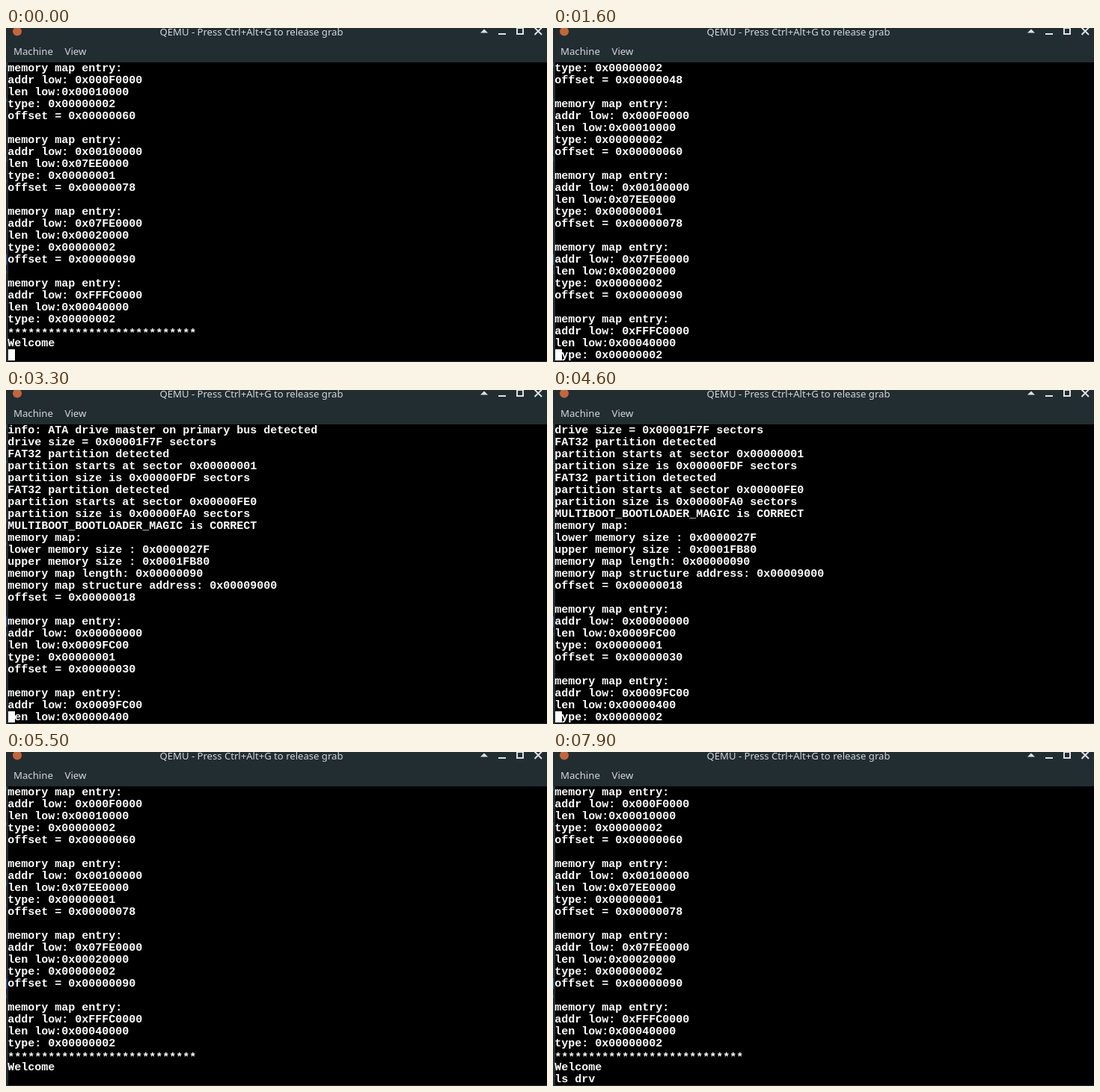
Animation, 723 px wide and 447 px high, one loop 8000 ms. Source, as an HTML page:

```html
<!DOCTYPE html>
<html lang="en">
<head>
<meta charset="utf-8">
<title>Terminal scrollback</title>
<style>
  html, body { margin: 0; width: 100%; height: 100%; overflow: hidden; background: #000; }
  svg { display: block; width: 723px; height: 447px; }
  .ui { font-family: "Noto Sans", sans-serif; font-size: 13.2px; fill: #d3d7d9; }
  .term { font: bold 15px "Liberation Mono", monospace; fill: #fff; white-space: pre; }
</style>
</head>
<body>
<svg viewBox="0 0 723 447" xmlns="http://www.w3.org/2000/svg">
  <rect width="723" height="447" fill="#000"/>
  <rect width="723" height="46" fill="#222d32"/>
  <rect y="46" width="3" height="401" fill="#222d32"/>
  <rect y="446" width="723" height="1" fill="#222d32"/>
  <g fill="#17576a">
    <rect y="46" width="1" height="6"/>
    <rect y="94" width="1" height="5"/>
    <rect y="172" width="1" height="7"/>
    <rect y="203" width="1" height="5"/>
    <rect y="325" width="1" height="4"/>
  </g>
  <rect y="303" width="1" height="14" fill="#2864c8"/>
  <circle cx="15" cy="4.5" r="6" fill="#c5653a"/>
  <g class="ui">
    <text x="328" y="10" text-anchor="middle" font-size="13.1">QEMU - Press Ctrl+Alt+G to release grab</text>
    <text x="10" y="36">Machine</text>
    <text x="78.5" y="36">View</text>
  </g>
  <path d="M634 6.5L639 1.5L644 6.5Z" fill="#dfe2e3"/>
  <g fill="none" stroke="#dfe2e3" stroke-width="2">
    <path d="M658 8H668"/>
    <rect x="683" y="0" width="8" height="8"/>
    <path d="M706.5 -.5L716 9M716 -.5L706.5 9"/>
  </g>
  <g id="rows" class="term"></g>
  <rect id="cursor" y="430" width="9" height="15" fill="#fff"/>
</svg>
<script>
const LOOP = 8000, ROWS = 25, LEFT = 3, TOP = 46, CELL_W = 9, CELL_H = 16;
const BEARING = -0.75; // glyphs sit left of the middle of their cell

// base, length, type and following offset of each memory region
const regions = [
  ['00000000', '0009FC00', 1, '30'],
  ['0009FC00', '00000400', 2, '48'],
  ['000F0000', '00010000', 2, '60'],
  ['00100000', '07EE0000', 1, '78'],
  ['07FE0000', '00020000', 2, '90'],
  ['FFFC0000', '00040000', 2]
];

const partition = (start, size) => [
  'FAT32 partition detected',
  `partition starts at sector 0x00000${start}`,
  `partition size is 0x00000${size} sectors`
];

const region = ([base, len, type, offset]) => [
  'memory map entry:',
  `addr low: 0x${base}`,
  `len low:0x${len}`,
  `type: 0x0000000${type}`,
  ...(offset ? [`offset = 0x000000${offset}`, ''] : [])
];

const log = [
  'info: ATA drive master on primary bus detected',
  'drive size = 0x00001F7F sectors',
  ...partition('001', 'FDF'),
  ...partition('FE0', 'FA0'),
  'MULTIBOOT_BOOTLOADER_MAGIC is CORRECT',
  'memory map:',
  'lower memory size : 0x0000027F',
  'upper memory size : 0x0001FB80',
  'memory map length: 0x00000090',
  'memory map structure address: 0x00009000',
  'offset = 0x00000018',
  '',
  ...regions.flatMap(region),
  '*'.repeat(28),
  'Welcome'
];

const command = 'ls drv';

// Each track holds [start time, value] pairs.
const scroll = [[0, 28], [500, 27], [800, 26], [1100, 25], [1900, 0],
  [4600, 1], [4700, 2], [4900, 3], [5500, 28]];
const typed = [[0, 0], [6800, 1], [7000, 2], [7200, 3], [7400, 4], [7600, 5], [7900, 6]];
const blink = [0, 300, 600, 800, 1100, 1300, 1600, 1900, 2200, 2400, 2800, 3100,
  3300, 3600, 3900, 4100, 4400, 4700, 5600, 5800, 6000, 6300, 6600, 6900,
  7200, 7400, 7700, 7900].map((t, i) => [t, i % 2 === 0]);

const at = (track, t) => track.findLast(([start]) => start <= t)[1];

const cursor = document.getElementById('cursor');
const rows = Array.from({ length: ROWS }, () => {
  const row = document.createElementNS('http://www.w3.org/2000/svg', 'text');
  row.setAttribute('x', LEFT + BEARING);
  return document.getElementById('rows').appendChild(row);
});

let shown = '';

function draw(t) {
  const top = at(scroll, t), count = at(typed, t), on = at(blink, t);
  const key = [top, count, on].join();
  if (key === shown) return;
  shown = key;
  const lines = [...log, command.slice(0, count)];
  rows.forEach((row, i) => {
    const line = lines[top + i];
    // asterisks sit mid-cell on a text console
    const drop = line.startsWith('*') ? 3 : 0;
    row.textContent = line;
    row.setAttribute('y', TOP + i * CELL_H + 12 + drop);
  });
  cursor.setAttribute('x', LEFT + count * CELL_W);
  cursor.setAttribute('visibility', on ? 'visible' : 'hidden');
}

const begin = performance.now();
function tick() {
  draw((performance.now() - begin) % LOOP);
  requestAnimationFrame(tick);
}
tick();
</script>
</body>
</html>
```
